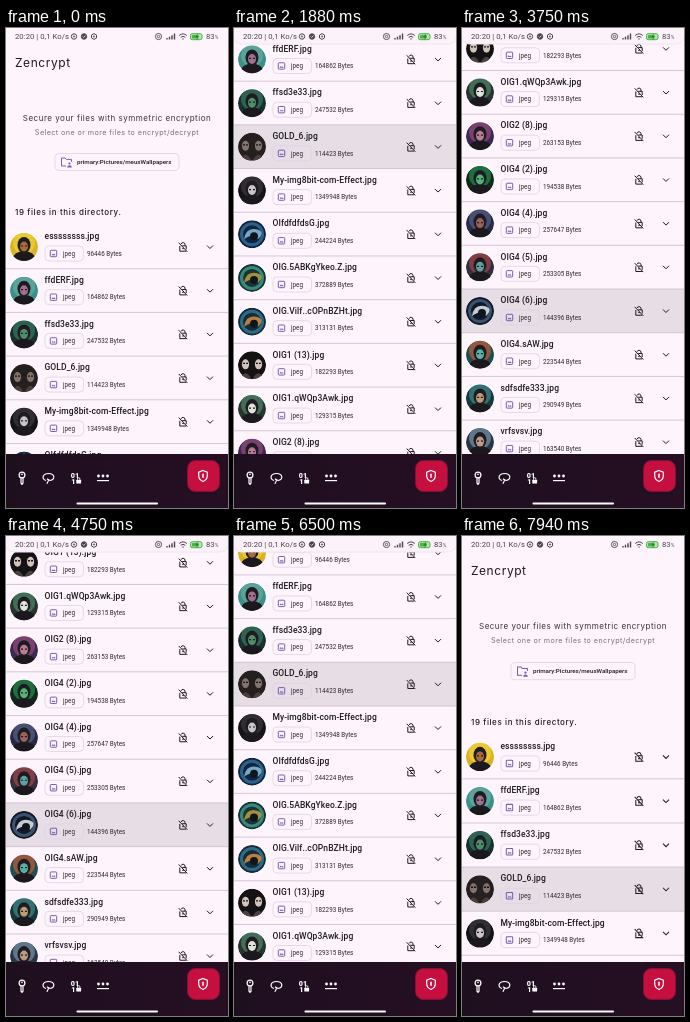
Recreate the animation shown at these times as an HTML page. Size 222 by 480 pixels, loop 8 s.

```html
<!DOCTYPE html>
<html lang="en">
<head>
<meta charset="utf-8">
<title>File encryption list</title>
<style>
html, body { margin: 0; width: 100%; height: 100%; overflow: hidden; background: #fdf4fc; }
svg { display: block; width: 100vw; height: 100vh; }
text { font-family: Roboto, "Noto Sans", sans-serif; fill: #1d1a20; }
.wide { font-family: Inter, "Open Sans", sans-serif; }
.name { font-size: 8.5px; font-weight: 500; letter-spacing: .08px; }
.size { font-size: 6.3px; fill: #2f2a33; }
.status { font-size: 7.7px; letter-spacing: .05px; fill: #4a464c; }
.line { fill: none; stroke: #1d1a20; stroke-width: 1; }
.white { fill: none; stroke: #fff; stroke-width: 1.2; }
.chip { fill: none; stroke: #dfd2e6; stroke-width: .8; }
.violet { fill: none; stroke: #7a5bb5; stroke-width: 1; }
</style>
</head>
<body>
<svg viewBox="0 0 222 480" preserveAspectRatio="none">
  <defs>
    <clipPath id="view"><rect y="16" width="222" height="410"/></clipPath>
    <clipPath id="disc"><circle r="14"/></clipPath>
    <linearGradient id="dark">
      <stop offset="0" stop-color="#1e0f1f"/>
      <stop offset="1" stop-color="#260f23"/>
    </linearGradient>
    <g id="unlock" class="line">
      <path d="M-3.2-1V4.2H3.2M-.8-1.2H3.2V2.4M-1.9-3A2 2 0 0 1 2-2.6V-1.2M-4.3-4.2 4.3 4.8"/>
      <circle cy="1.6" r=".4"/>
    </g>
    <g id="image" class="violet">
      <rect x="-3.2" y="-3.2" width="6.4" height="6.4" rx=".8"/>
      <path d="M-2 1.7-.7 0 .3 1.1 1.1.2 2.2 1.7Z" fill="#7a5bb5" stroke="none"/>
    </g>
  </defs>

  <rect width="222" height="480" fill="#fdf4fc"/>

  <g clip-path="url(#view)">
    <g id="page">
      <text class="wide" x="9" y="39" font-size="12" letter-spacing=".55">Zencrypt</text>
      <text class="wide" x="111" y="92.5" font-size="8" letter-spacing=".51" text-anchor="middle" style="fill:#37323b">Secure your files with symmetric encryption</text>
      <text class="wide" x="111" y="106.5" font-size="7.2" letter-spacing=".42" text-anchor="middle" style="fill:#77717c">Select one or more files to encrypt/decrypt</text>
      <rect class="chip" x="49" y="125.5" width="124" height="17" rx="4"/>
      <path class="violet" d="M60 138H55.500V130h3.500l1.400 1.400h5v2.500"/>
      <circle cx="63.500" cy="135.500" r="1.100" fill="#7a5bb5"/>
      <path d="M61.200 139.500q0-2.200 2.300-2.200t2.300 2.200Z" fill="#7a5bb5"/>
      <text x="71" y="136.2" font-size="6.2" font-weight="500">primary:Pictures/meusWallpapers</text>
      <text class="wide" x="9" y="187" font-size="8" font-weight="500" letter-spacing=".6">19 files in this directory.</text>
      <rect id="press" width="222" height="43.7" fill="#1d1a20" opacity="0"/>
      <g id="rows"></g>
    </g>
  </g>

  <!-- status bar -->
  <rect id="band" x="-.5" y="-12" width="223" height="28" rx="8" fill="#fbf2fa" stroke="#efe5ef"/>
  <g>
    <text class="status" x="9" y="11.3">20:20 | 0,1 Ko/s</text>
    <g fill="none" stroke="#4a464c">
      <circle cx="68" cy="8.5" r="2.7"/><circle cx="68" cy="8.5" r=".6"/>
      <circle cx="78" cy="8.5" r="2.7" fill="#4a464c"/>
      <path d="M76.6 8.4l1.1 1.1 1.8-2" stroke="#fdf4fc" stroke-width=".8"/>
      <path d="M88 5.6l2.5 1.4v3L88 11.4 85.5 10V7Z"/><circle cx="88" cy="8.5" r=".6"/>
      <circle cx="152.500" cy="8.500" r="3.100" stroke-width=".9"/><circle cx="152.500" cy="8.500" r="1.200" stroke-width=".8"/>
      <path d="M161 11.500v-1.500M163.500 11.500v-2.800M166 11.500v-4.200M168.500 11.500v-6" stroke-width="1.400"/>
      <path d="M173.200 7.500q3.800-3.200 7.600 0M174.700 9.300q2.300-1.900 4.600 0"/>
      <circle cx="177" cy="11" r=".7" fill="#4a464c" stroke="none"/>
    </g>
    <rect x="184.500" y="5.700" width="11.500" height="6" rx="1.800" fill="#b9e4b4" stroke="#46b345"/>
    <rect x="186" y="7" width="6.500" height="3.400" rx=".6" fill="#46b345"/>
    <path d="M191.800 5.500l-2.400 3.500h1.600l-.5 3 2.500-3.700h-1.600Z" fill="#2f7d30"/>
    <text class="status" x="200" y="11.300">83<tspan font-size="5">%</tspan></text>
  </g>

  <!-- bottom bar -->
  <rect y="426" width="222" height="54" fill="url(#dark)"/>
  <g class="white">
    <circle cx="16" cy="447" r="2.900"/><circle cx="16" cy="446.400" r=".8" fill="#fff" stroke="none"/>
    <path d="M15 450v5.300l1 1 1-1V450"/>
    <path d="M40 452.500C35.500 451.500 36 445.500 42.500 445.500S49.500 451.500 44 452.500M44 452.500l-3-1.600M42.500 452.500l-1.600 3.200"/>
    <rect x="70.300" y="451.700" width="4.800" height="3.800" rx=".6" fill="#fff" stroke="none"/>
    <path d="M71.500 451.700v-.8a1.200 1.200 0 0 1 2.400 0v.8" stroke-width=".9"/>
    <path d="M91 452.600h12"/>
    <g fill="#fff" stroke="none"><circle cx="92.500" cy="448" r="1.400"/><circle cx="97" cy="448" r="1.400"/><circle cx="101.500" cy="448" r="1.400"/></g>
  </g>
  <g font-size="7.200" font-weight="900">
    <text x="64.800" y="449.600" style="fill:#fff">01</text>
    <text x="65.200" y="455.600" style="fill:#fff">1</text>
  </g>
  <rect x="181.500" y="432.500" width="32" height="31" rx="8" fill="#c5103f" stroke="#84103a"/>
  <path class="white" d="M197 442.500l4.300 1.700v3.400c0 2.900-1.800 4.900-4.300 5.900-2.500-1-4.300-3-4.300-5.900v-3.400Z"/>
  <path d="M197 446.200v3" stroke="#fff" stroke-width="1.500" stroke-linecap="round"/>
  <rect x="70.500" y="474.600" width="81.500" height="1.800" rx=".9" fill="#fff"/>
</svg>
<script>
const LOOP = 8000, TOP = 197, PITCH = 43.7, EDGE = 16;

// name, bytes, picture kind, ground, middle tone, light tone
const files = [
  ["essssssss", 96446, "figure", "#d8b323", "#f0cf35", "#a66a3c"],
  ["ffdERF", 164862, "figure", "#3b9189", "#66aaa0", "#a0708c"],
  ["ffsd3e33", 247532, "figure", "#1a302f", "#34745c", "#4f8f68"],
  ["GOLD_6", 114423, "pair", "#24201f", "#4b3f3e", "#84736d"],
  ["My-img8bit-com-Effect", 1349948, "figure", "#141315", "#3a373d", "#c9c4c8"],
  ["OIfdfdfdsG", 244224, "swirl", "#10253f", "#2c618c", "#77a9c7"],
  ["OIG.5ABKgYkeo.Z", 372889, "swirl", "#1b3433", "#358a80", "#a1913f"],
  ["OIG.Vilf..cOPnBZHt", 313131, "swirl", "#182b3a", "#2c6c85", "#b9803f"],
  ["OIG1 (13)", 182293, "pair", "#151214", "#4b4144", "#d4c3bb"],
  ["OIG1.qWQp3Awk", 129315, "figure", "#27352e", "#4c8063", "#dfe3da"],
  ["OIG2 (8)", 263153, "figure", "#3d2952", "#8d4a78", "#b97c93"],
  ["OIG4 (2)", 194538, "figure", "#10291b", "#24864a", "#55b477"],
  ["OIG4 (4)", 257647, "figure", "#292a48", "#515c85", "#9b6358"],
  ["OIG4 (5)", 253305, "figure", "#34303f", "#9c4348", "#5ca0a0"],
  ["OIG4 (6)", 144396, "swirl", "#111827", "#3b526d", "#c4cbd1"],
  ["OIG4.sAW", 223544, "figure", "#214e50", "#b85a37", "#55b2a3"],
  ["sdfsdfe333", 290949, "figure", "#18383d", "#3c8584", "#b99b74"],
  ["vrfsvsv", 163540, "figure", "#273648", "#728ca0", "#bd9c84"],
  ["xcvsdfd", 201377, "figure", "#30263c", "#6d5987", "#b195a5"]
];

const art = {
  figure: (mid, light) => `
    <circle cy="-4" r="11" fill="${mid}" opacity=".75"/>
    <path d="M-13 14Q-10 4 0 4T13 14Z" fill="#1b181e"/>
    <ellipse cy="-2" rx="6.5" ry="8" fill="#1f1b22"/>
    <ellipse cy="-.5" rx="4" ry="5" fill="${light}"/>
    <path d="M-3-1h2M1-1h2" stroke="#1b181e" stroke-width="1.2"/>`,
  pair: (mid, light) => [-6.5, 6.5].map(x => `
    <path d="M${x - 6} 14Q${x} 2 ${x + 6} 14Z" fill="${mid}"/>
    <ellipse cx="${x}" cy="-1" rx="3.6" ry="5" fill="${light}"/>
    <path d="M${x - 2.5}-2h2M${x + .5}-2h2" stroke="#151214" stroke-width="1.3"/>`).join(""),
  swirl: (mid, light) => `
    <circle r="10.5" fill="none" stroke="${mid}" stroke-width="3"/>
    <path d="M-8 5Q-6-7 4-5T6 5Q1-2-8 5Z" fill="${light}"/>
    <circle cx="2" cy="2" r="4" fill="#10151c"/>`
};

function row([name, bytes, kind, ground, mid, light], i) {
  return `<g transform="translate(0 ${TOP + i * PITCH})">
    <path d="M0 ${PITCH}H222" stroke="#c8bdcb" stroke-width=".8"/>
    <g transform="translate(18 22)" clip-path="url(#disc)">
      <circle r="14" fill="${ground}"/>${art[kind](mid, light)}
    </g>
    <text class="name" x="38.5" y="14.2">${name}.jpg</text>
    <rect class="chip" x="39" y="21" width="38.5" height="15" rx="4"/>
    <use href="#image" x="47.5" y="28.5"/>
    <text class="size" x="57" y="30.8">jpeg</text>
    <text class="size" x="81" y="30.8">${bytes} Bytes</text>
    <use href="#unlock" x="177" y="22"/>
    <path class="line" d="M201 20.5l3 3 3-3" stroke-width="1.3"/>
  </g>`;
}

const page = document.getElementById("page");
const press = document.getElementById("press");
const band = document.getElementById("band");
document.getElementById("rows").innerHTML = files.map(row).join("");

// [time, scroll offset]
const path = [[0, 0], [810, 0], [1880, 231], [2810, 450], [3130, 450], [4150, 598],
  [4750, 542], [5690, 294], [5940, 248], [6130, 248], [7130, 61], [7690, 0], [LOOP, 0]];
// [time, pressed row]
const touches = [[60, 3], [2600, 14], [5450, 6], [5880, 3]];

const clamp = x => Math.max(0, Math.min(1, x));
const slope = i => (path[i + 1][1] - path[i][1]) / (path[i + 1][0] - path[i][0]);

// Monotone tangent: flat at rests and turning points
function tangent(i) {
  if (i === 0 || i === path.length - 1) return 0;
  const a = slope(i - 1), b = slope(i);
  return a * b <= 0 ? 0 : 2 * a * b / (a + b);
}

function scrollAt(t) {
  let i = 0;
  while (i < path.length - 2 && t >= path[i + 1][0]) i++;
  const [t0, y0] = path[i], [t1, y1] = path[i + 1];
  const d = t1 - t0, u = (t - t0) / d, v = 1 - u;
  return y0 * (1 + 2 * u) * v * v + y1 * u * u * (3 - 2 * u)
    + d * u * v * (tangent(i) * v - tangent(i + 1) * u);
}

// Pulling past the top stretches the page slightly
const stretchAt = t => .0095 * clamp((t - 7600) / 320);

function draw(t) {
  const y = scrollAt(t), k = stretchAt(t);
  page.setAttribute("transform", `matrix(1 0 0 ${1 + k} 0 ${-EDGE * k - y})`);
  band.setAttribute("opacity", clamp(y / 20));
  const touch = touches.filter(([start]) => t >= start).pop();
  press.setAttribute("opacity", touch ? .1 * clamp((t - touch[0]) / 130) : 0);
  if (touch) press.setAttribute("y", TOP + touch[1] * PITCH);
}

const start = performance.now();
function tick() {
  draw((performance.now() - start) % LOOP);
  requestAnimationFrame(tick);
}
draw(0);
requestAnimationFrame(tick);
</script>
</body>
</html>
```
